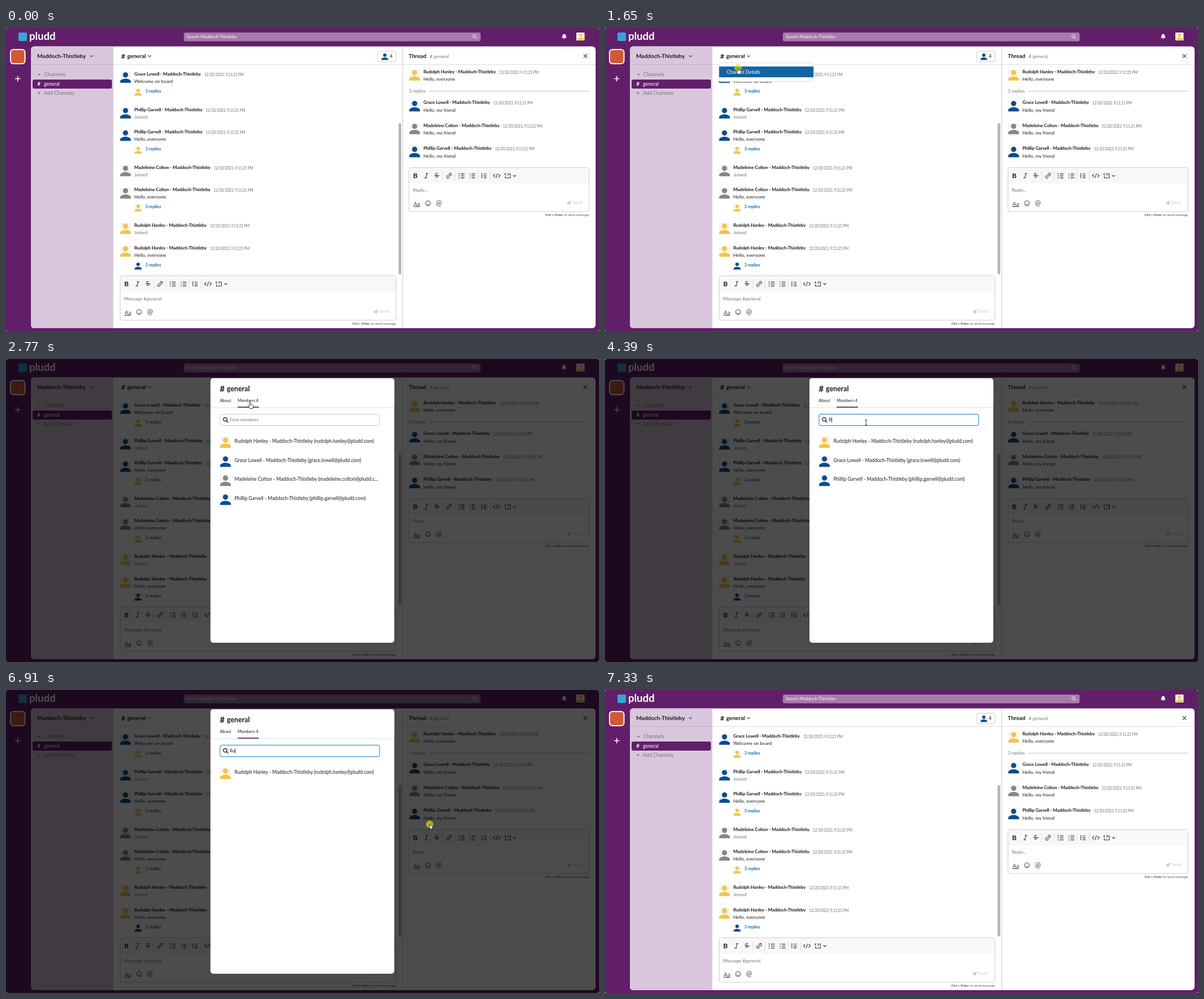
An HTML page for the animation above (8430 ms loop, 1047 by 535 pixels).

```html
<!DOCTYPE html>
<html lang="en">
<head>
<meta charset="utf-8">
<title>Team chat: channel details</title>
<style>
html, body { margin: 0; width: 100%; height: 100%; overflow: hidden; background: #fff }
svg { display: block; width: 1047px; height: 535px; font-family: Lato, "Open Sans", sans-serif }
.b { font-weight: 700 }
.name { font-weight: 700; letter-spacing: -.17px }
.time { font-weight: 400; font-size: 6.6px; letter-spacing: -.2px; fill: #717171 }
.line { fill: none; stroke: #333; stroke-width: 1.1 }
</style>
</head>
<body>
<svg viewBox="0 0 1047 535"><g id="page"></g><g id="layer"></g></svg>
<script>
const LOOP = 8430, INK = '#1d1c1d', GREY = '#717171', PURPLE = '#611f69', BLUE = '#1264a3';
const TEAM = 'Maddoch-Thistleby', APP = 'pludd';
const person = (name, color) => ({ name, color });
const rudolph = person('Rudolph Hanley', '#f4c544'), grace = person('Grace Lowell', '#0b4d8f'),
  madeleine = person('Madeleine Colton', '#868686'), phillip = person('Phillip Garvell', '#0b4d8f');

// y is the vertical middle of the line of text
const text = (x, y, s, size = 8.2, fill = INK, attrs = '') =>
  `<text x="${x}" y="${y + size * .35}" font-size="${size}" fill="${fill}" ${attrs}>${s}</text>`;
const bold = (x, y, s, size, fill) => text(x, y, s, size, fill, 'class="b"');
const rect = (x, y, w, h, fill, r = 0, attrs = '') =>
  `<rect x="${x}" y="${y}" width="${w}" height="${h}" fill="${fill}" rx="${r}" ${attrs}/>`;
const card = (x, y, w, h, r = 4) => rect(x, y, w, h, '#fff', r, 'stroke="#ccc"');
const line = (d, attrs = '') => `<path class="line" d="${d}" ${attrs}/>`;
const rule = (d, color = '#ddd') => line(d, `style="stroke:${color};stroke-width:1"`);
const at = (x, y, s) => `<g transform="translate(${x} ${y})">${s}</g>`;
const chevron = (x, y) => line(`M${x - 2.5} ${y - 1.2}l2.5 2.5 2.5-2.5`);
const lens = (x, y, r, color, w) =>
  line(`M${x + r} ${y}a${r} ${r} 0 1 0 ${-2 * r} 0a${r} ${r} 0 1 0 ${2 * r} 0M${x + r * .7} ${y + r * .7}l${r} ${r}`,
    `style="stroke:${color};stroke-width:${w}"`);
const avatar = (x, y, color, k = 1) => `<g transform="translate(${x} ${y}) scale(${k})">
  ${rect(0, 0, 19, 19.8, '#f6f6f5', 2)}<g fill="${color}"><circle cx="9.5" cy="5.8" r="4.6"/>
  <path d="M0 19.8V17.4C0 14.2 6.3 12.4 9.5 12.4S19 14.2 19 17.4V19.8Z"/></g></g>`;

function message(x, y, who, body, replier, gap = 12.7) {
  return avatar(x, y - 4, who.color) +
    text(x + 25, y, `${who.name} - ${TEAM}<tspan class="time" dx="6" dy="1">12/20/2023, 9:11:21 PM</tspan>`,
      8.1, INK, 'class="name"') +
    text(x + 25, y + gap, body, 8.2, body == 'Joined' ? GREY : INK) +
    (replier ? avatar(x + 25.5, y + 25.5, replier.color, .66) + bold(x + 44.5, y + 30.3, '3 replies', 7.4, BLUE) : '');
}

function editor(x, y, w, h, hint) {
  const foot = h - 15;
  return at(x, y,
    card(0, 0, w, h) +
    `<path d="M.5 28V4Q.5.5 4 .5H${w - 4}Q${w - .5}.5 ${w - .5} 4V28Z" fill="#f8f8f8"/>` +
    at(0, 14.3,
      bold(7.2, 0, 'B', 12) + text(46, 0, 'S', 10.5) +
      line('M29.5-4h4.5M27-4m0 8h4.5M32-4l-2.5 8M45 0h9') +
      `<g transform="translate(70.7 0) rotate(-45)">${line('M-1-2h-2.3a2 2 0 0 0 0 4h2.3M1-2h2.3a2 2 0 0 1 0 4h-2.3M-2 0h4')}</g>` +
      line('M91.5-3.2h6.5M91.5.3h6.5M91.5 3.8h6.5M88.5-4.7v2.6M88.5-1v2.5M88.5 2.6v2.4') +
      line('M110.5-3.2h6.5M110.5.3h6.5M110.5 3.8h6.5M107-3.2h1.5M107 .3h1.5M107 3.8h1.5') +
      line('M128.5-4.5v9M131.5-3h5.5M131.5.3h5.5M131.5 3.6h5.5') +
      line('M152-3l-3 3 3 3M158-3l3 3-3 3M156.2-4l-2.4 8') +
      line('M171-4.5l-2 2 2 2M174-4.5l2 2-2 2M177-3.5h1.8v7.5h-8.8v-3') +
      chevron(186.5, 0) + rule('M59.5-8v16M81-8v16M122-8v16M143.5-8v16')) +
    text(7, h / 2 + 1.3, hint, 8.4, GREY) +
    text(8, foot + 1, 'Aa', 10, '#444') + line(`M8 ${foot + 6.3}h11.5`) +
    at(33.5, foot + .5, line('M4.5 0a4.5 4.5 0 1 0-9 0a4.5 4.5 0 1 0 9 0M-2.4 1a2.5 2.5 0 0 0 4.8 0M-1.6-2v1.2M1.6-2v1.2',
      'style="stroke-width:.9"')) +
    text(47.5, foot, '@', 12.5, '#444') +
    at(w - 36, foot - .5, '<path d="M-4 .5l8-4.5-1.5 8-2.5-1.5-1.6 2v-2.7z" fill="#ccc"/>') +
    text(w - 30, foot - .5, 'Send', 8.2, '#ccc') +
    text(w, h + 6, '<tspan class="b">Ctrl + Enter</tspan> to send message', 6.1, '#555', 'text-anchor="end"'));
}

function page() {
  const feed = [
    [81, grace, 'Welcome on board', rudolph], [144, phillip, 'Joined'], [183.5, phillip, 'Hello, everyone', rudolph],
    [246, madeleine, 'Joined'], [285.5, madeleine, 'Hello, everyone', rudolph],
    [348, rudolph, 'Joined'], [388, rudolph, 'Hello, everyone', grace]];
  const thread = [[77, rudolph, 'Hello, everyone'], [131.5, grace, 'Hello, my friend'],
    [171.7, madeleine, 'Hello, my friend'], [212.4, phillip, 'Hello, my friend']];
  return rect(0, 0, 1047, 535, PURPLE, 3) +
    // top bar and workspace strip
    rect(22, 8, 15, 15, '#36a5d8', 2) + bold(41, 14.6, APP, 18.5, '#fff') +
    rect(314, 8, 524, 15.5, '#a67bab', 3) + text(319, 15.7, 'Search ' + TEAM, 7.6, '#fff') + lens(827, 14.5, 2.7, '#fff', 1) +
    '<path d="M981 17.5q1.5-1 1.5-3.5 0-3 3-3.2 3 .2 3 3.2 0 2.5 1.5 3.5zM984 18.5h3q-1.5 2-3 0z" fill="#fff"/>' +
    rect(1007, 8, 14.5, 14, '#fff8e2', 1) + avatar(1008.5, 9, rudolph.color, .62) +
    rect(8, 38, 25.5, 25, '#cf5a34', 5, 'stroke="#fff" stroke-width="2"') +
    line('M16 89.5h9.5M20.7 84.7v9.5', 'style="stroke:#fff;stroke-width:1.5"') +
    // sidebar
    rect(44, 32.5, 997, 497.5, '#fff', 6) +
    '<path d="M189.5 32.5V530H50Q44 530 44 524V38.5Q44 32.5 50 32.5Z" fill="#d9c6dc"/>' +
    bold(55, 49.7, TEAM, 10) + chevron(151, 49.5) +
    '<path d="M56.5 81h5l-2.5 3z" fill="#7d7080"/>' + text(67.5, 81.7, 'Channels', 9.2, '#7d7080') +
    rect(47, 91, 140, 16, PURPLE, 3) + bold(55.5, 99, '#', 9, '#fff') + text(67, 99, 'general', 8.6, '#fff') +
    line('M55.5 114.8h5.5M58.2 112v5.5', 'style="stroke:#7d7080;stroke-width:.9"') +
    text(67, 115, 'Add Channels', 8.8, '#7d7080') +
    // channel
    rule('M44 64.5H189.5', '#c2b0c6') + rule('M190 64.5H1041') + rule('M700.5 32.5V530', '#ccc') +
    bold(203.5, 49.7, '#', 12) + bold(214, 49.7, 'general', 10.1) + chevron(253.5, 49.5) +
    card(656.5, 41, 32, 18.5, 3) + avatar(663, 44.3, grace.color, .62) + text(677.5, 50, '4', 8.6) +
    feed.map(([y, ...m]) => message(201.5, y, ...m)).join('') +
    rect(693, 168, 5, 267, '#b9b9b9', 2.5) +
    editor(201.5, 437.5, 487, 78.5, 'Message #general') +
    // thread
    bold(711, 49.7, 'Thread', 10) + text(748, 49.7, '# general', 8.4, GREY) +
    line('M1019.7 46.2l6.6 6.6m0-6.6l-6.6 6.6') +
    thread.map(([y, who, s]) => message(712, y, who, s, null, 13.6)).join('') +
    text(711, 111.5, '3 replies', 8.1, GREY) + rule('M747 111.5H1030', '#c4c4c4') +
    editor(711.5, 246.5, 318, 77.5, 'Reply...');
}

const menu = hover => rect(201.5, 61.5, 166.5, 33, '#fff', 3, 'stroke="#ddd"') +
  (hover ? rect(201.5, 68, 166.5, 19, BLUE) : '') + text(215, 77.5, 'Channel Details', 8.6, hover ? '#fff' : INK);

function aboutTab() {
  return card(378, 97.5, 281.5, 43.5) + bold(389.5, 112, 'Channel Name', 8.5) +
    bold(389.5, 125.7, '#', 10.5) + text(399.5, 125.7, 'general', 8.6) +
    card(378, 152.5, 281.5, 99) + rule('M378 208.5h281.5') +
    bold(389.5, 167, 'Description', 8.5) +
    text(389.5, 181, "This is the one channel that will always include everyone. It's a great", 8.7) +
    text(389.5, 193, 'spot for announcements and team-wide conversations.', 8.7) +
    bold(389.5, 222.5, 'Created by', 8.5) +
    text(389.5, 236.7, `@${grace.name} - ${TEAM} on December 20, 2023`, 8.5);
}

function membersTab(t) {
  const query = t < 4390 ? '' : t < 4690 ? 'R' : 'Ru', focus = t >= 3470;
  const typedAt = query == 'Ru' ? 4690 : query ? 4390 : 3470;
  const caret = focus && (t - typedAt) % 1000 < 500;
  const rows = [rudolph, grace, madeleine, phillip].filter(p => p.name.toLowerCase().includes(query.toLowerCase()));
  return (focus ? rect(378, 97.5, 281.5, 20, '#fff', 3, 'stroke="#cfe8f6" stroke-width="2.6"') : '') +
    rect(378, 97.5, 281.5, 20, '#fff', 3, `stroke="${focus ? '#2f8cc4' : '#ccc'}"`) +
    lens(387, 106.6, 3.2, '#111', 1.3) +
    text(395, 107.3, query || 'Find members', 8.2, query ? INK : '#777') +
    (caret ? rect([395, 400.2, 404.3][query.length], 103, .8, 9, INK) : '') +
    rows.map((p, i) => {
      const y = 145.2 + 33.6 * i, tail = p == madeleine ? '.c...' : '.com)';
      return avatar(378, y - 8, p.color) +
        text(403.5, y, `${p.name} - ${TEAM} (${p.name.toLowerCase().replace(' ', '.')}@${APP}${tail}`, 8.5);
    }).join('');
}

function dialog(t) {
  const about = t < 2770;
  return rect(0, 0, 1047, 535, '#000', 3, 'opacity=".7"') + rect(361, 34, 324.5, 467, about ? '#f8f8f8' : '#fff', 5) +
    rect(361, 34, 324.5, 52, '#fff', 5) + rule('M361 86H685.5') +
    bold(377.5, 52.5, '#', 15) + bold(390, 52.5, 'general', 12.3) +
    text(377.5, 73, 'About', 7.4) + text(409, 73, 'Members 4', 7.4) +
    line(about ? 'M378 85h19.5' : 'M409 85h37.5', 'style="stroke:#3b1445;stroke-width:1.4"') +
    (about ? aboutTab() : membersTab(t));
}

// pointer way points: time, x, y
const WAY = [[260, 669, 352], [960, 234, 50], [1450, 234, 50], [1550, 235, 70], [1870, 235, 70], [2570, 431, 76],
  [2770, 431, 76], [3070, 461, 112], [5400, 461, 112], [6110, 763, 224], [6310, 753, 228], [6510, 748, 237],
  [7130, 748, 237], [7230, 930, 412]];
const CLICKS = [[1350, 1450], [1650, 1770], [2670, 2770], [3370, 3590], [6810, 7010]];
const SHAPES = {
  arrow: 'M0 0V9.3L2.2 7.3 3.7 10.8 5.2 10.1 3.7 6.8H6.7Z',
  hand: 'M-1 1.2Q0-.8 1 1.2V4.5L4.5 5.3Q6 5.8 5.6 7.6L4.6 11.5H-.2L-3.6 7.3Q-3.4 5.6-1 7.2Z',
  beam: 'M-1.8-4.5H1.8M0-4.5V4.5M-1.8 4.5H1.8'
};
const within = (t, a, b) => t >= a && t < b;

function pointer(t) {
  if (!within(t, 260, 7330)) return '';
  const i = Math.max(1, WAY.findIndex(w => w[0] >= t));
  const [a, b] = [WAY[i - 1], WAY[i]];
  const u = (t - a[0]) / (b[0] - a[0]), e = u * u * (3 - 2 * u);
  const x = a[1] + (b[1] - a[1]) * e, y = a[2] + (b[2] - a[2]) * e;
  const kind = within(t, 860, 1770) || within(t, 2570, 2870) ? 'hand'
    : t >= 2970 && y > 97 && y < 118 ? 'beam' : 'arrow';
  const click = CLICKS.some(c => within(t, ...c));
  return at(x, y, (click ? '<circle r="6.5" fill="#e8e000" opacity=".65"/>' : '') +
    `<path d="${SHAPES[kind]}" fill="#fff" stroke="#111" stroke-width=".8"/>`);
}

const STEPS = [[0, 1], [260, 8], [1350, 4], [1770, 1], [1970, 9], [2870, 3], [3370, 2], [3590, 1], [3990, 1], [4390, 1],
  [4690, 1], [5190, 1], [5500, 8], [6310, 1], [6410, 2], [6810, 3], [7230, 2]]
  .flatMap(([start, n]) => Array.from({ length: n }, (_, i) => start + 100 * i));

const layer = document.getElementById('layer');
document.getElementById('page').innerHTML = page();
let shown = -1;
function draw(now) {
  const t = STEPS.findLast(s => s <= now % LOOP) ?? 0;
  if (t != shown) {
    shown = t;
    layer.innerHTML = (within(t, 1450, 1770) ? menu(t >= 1550) : '') +
      (within(t, 1770, 7010) ? dialog(t) : '') + pointer(t);
  }
  requestAnimationFrame(draw);
}
draw(performance.now());
</script>
</body>
</html>
```
